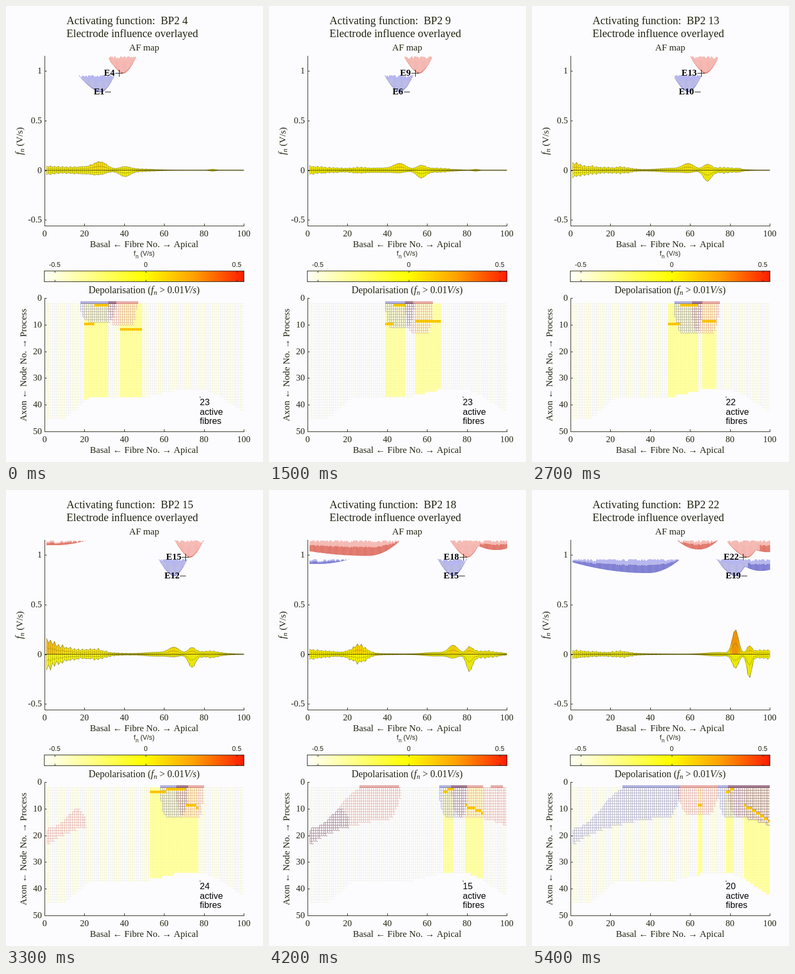
These frames come from a looping animation (480x851 px, 5.7 s). An HTML page with a canvas:

```html
<!DOCTYPE html>
<html lang="en">
<head>
<meta charset="utf-8">
<title>Activating function</title>
<style>
html, body { margin: 0; width: 100%; height: 100%; overflow: hidden; background: #fcfcfe; }
canvas { display: block; width: 480px; height: 851px; }
</style>
</head>
<body>
<canvas id="stage" width="480" height="851"></canvas>
<script>
const ctx = document.getElementById('stage').getContext('2d');
const SERIF = '"Liberation Serif", serif', SANS = '"Liberation Sans", sans-serif';
const PAPER = '#fcfcfe', INK = '#222212';
const STEP_MS = 300, STEPS = 19, PITCH = 3.722;
const RED = { body: '#f4b6b0', roof: '#f5bcb6', strong: '#df7468', mesh: '#ecbcb6', bar: '#eab0ac' };
const BLUE = { body: '#b8b8e6', roof: '#b6b6f2', strong: '#7c7cd2', mesh: '#b8b6d4', bar: '#b4b4de' };

const fibreX = n => 72 + n * PITCH;
const nodeY = n => 545 + n * 4.98;
const volts = v => 306.5 - v * 185.5;
const clamp = t => Math.min(1, Math.max(0, t));
const ease = t => { t = clamp(t); return t * t * (3 - 2 * t); };
const bell = (x, centre, width) => Math.exp(-(((x - centre) / width) ** 2));
const noise = (a, b = 0) => {
  const v = Math.sin(a * 127.1 + b * 311.7) * 43758.5453;
  return v - Math.floor(v);
};

// Electrodes sit closer together towards the apex.
const apexOf = e => 178 + 12.36 * (e - 1) - 0.165 * (e - 1) * (e - 12);

// Last node of a fibre.
const floorNode = n => 45.5 - 8 * ease((n - 8) / 16) - 3.5 * ease((n - 45) / 30) +
  9.5 * clamp((n - 78) / 22) ** 1.3;

// Number of active fibres, between a few known steps.
const COUNTS = [[0, 23], [3, 24], [5, 23], [9, 22], [11, 24], [14, 15], [18, 20]];
function activeCount(step) {
  const i = Math.max(1, COUNTS.findIndex(([s]) => s >= step));
  const [s0, c0] = COUNTS[i - 1], [s1, c1] = COUNTS[i];
  return Math.round(c0 + (c1 - c0) * (step - s0) / (s1 - s0));
}

// The reach of one electrode: a valley below it, a shoulder at the apical end
// and, for deep electrodes, a second valley on the neighbouring turn.
function field(e) {
  const apex = apexOf(e), left = 29 + 14 / e ** 2 + 2 * Math.max(0, e - 16), right = 25;
  const base = Math.min(13, 8.5 + e / 2);
  const far = {
    x: 185 + 31.5 * (e - 18),
    left: 160 - 40 * (e - 19),
    right: Math.min(60, 60 - 8 * (e - 19)),
    depth: e < 15 ? 0 : Math.min(9 + 6.6 * (e - 15), 29 - 3 * (e - 18))
  };
  const tail = Math.min(22, Math.max(0, 6 * (e - 15))), tailX = 424 + 4 * (e - 18);
  const reach = x => Math.min(1, Math.abs(x - apex) / (x < apex ? left : right));
  const isFar = x => x < apex - left;

  function depth(x) {
    if (isFar(x)) {
      const u = (x - far.x) / (x < far.x ? far.left : far.right);
      return far.depth * Math.max(0, 1 - u * u);
    }
    const shoulder = x > apex ? tail * (1 - ((x - tailX) / 50) ** 2) : 0;
    return Math.max(32 * (1 - reach(x) ** 1.6), shoulder, 0);
  }

  // First and last node covered on the fibre at x.
  function rows(x) {
    const d = depth(x);
    if (d < 0.4) return null;
    let top = 2, low = 2 + (base - 2) * (1 - reach(x) ** 6);
    if (isFar(x)) {
      low = 11.5 + 11.5 * Math.exp((76 - x) / 85);
      top = 17.5 - 15.5 * ease((x - 76) / 104);
      if (x < 200) top = Math.max(top, low - 1 - d * (0.8 + ((x - 76) / 70) ** 2));
      else low = Math.min(low, 2 + 10 * Math.sqrt(d / 12));
    } else if (tail && x > apex) low = Math.max(low, 13 + Math.max(0, x - 395) / 16);
    return low > top ? [Math.round(top), Math.round(low)] : null;
  }

  const touchesTop = x => {
    const r = rows(x);
    return r && r[0] === 2 && depth(x) > (x > apex + right ? 17 : 2);
  };
  return { e, apex, far, depth, rows, touchesTop, isStrong: x => e > 14 && (isFar(x) || x > apex + 22) };
}

// Active ranges: the positive side swings in width, the negative side takes the rest.
function activeBlocks(step, minus, plus) {
  const start = plus.apex - 8;
  const end = Math.min(444, plus.apex + 30 + 15 * Math.cos(2 * Math.PI * (step - 3) / 15));
  const farWidth = plus.e > 20 ? 10 : 0;
  const rest = Math.max(4 * PITCH, activeCount(step) * PITCH - (end - start) - farWidth);
  const centre = minus.apex - 11;
  return [[centre - rest / 2, centre + rest / 2], [start, end], [plus.far.x - 2, plus.far.x - 2 + farWidth]];
}

// Node at which firing starts, for a place u (0 to 1) within a block.
function onsetNode(block, u, step) {
  if (block === 0) return u > 0.4 ? 2 : step < 10 ? 9 : 3;
  if (block === 1) return Math.round(8 + Math.max(0, 3 - step) + u * 0.75 * Math.max(0, step - 10));
  return 8;
}

function rect(x, y, w, h, color) {
  ctx.fillStyle = color;
  ctx.fillRect(Math.round(x), Math.round(y), Math.round(w), Math.round(h));
}

function text(str, x, y, font, align = 'left', color = INK) {
  ctx.font = font;
  ctx.textAlign = align;
  ctx.fillStyle = color;
  ctx.fillText(str, x, y);
}

// Draws runs of [text, font, drop] as one centred line.
function runs(parts, cx, y) {
  const widths = parts.map(([s, font]) => { ctx.font = font; return ctx.measureText(s).width; });
  let x = cx - widths.reduce((a, b) => a + b) / 2;
  parts.forEach(([s, font, drop = 0], i) => {
    text(s, x, y + drop, font);
    x += widths[i];
  });
}

function upright(cx, cy, draw) {
  ctx.save();
  ctx.translate(cx, cy);
  ctx.rotate(-Math.PI / 2);
  draw();
  ctx.restore();
}

function polygon(points, color) {
  ctx.beginPath();
  points.forEach(([x, y]) => ctx.lineTo(x, y));
  ctx.fillStyle = color;
  ctx.fill();
}

function polyline(points, color) {
  ctx.beginPath();
  points.forEach(([x, y]) => ctx.lineTo(x, y));
  ctx.strokeStyle = color;
  ctx.stroke();
}

function drawValley(f, top, tint) {
  const roof = n => (noise(n, f.e) > 0.45 ? noise(n, f.e + 9) * 5 : 0.5);
  for (let n = 1; n < 100; n += 0.5) {
    const x = fibreX(n), x2 = fibreX(n + 0.5), d = f.depth(x), d2 = f.depth(x2);
    if (d < 0.4 && d2 < 0.4) continue;
    const a = Math.min(roof(n), d), b = Math.min(roof(n + 0.5), d2);
    const band = (from, to, color) => polygon([
      [x, top + a + (d - a) * from], [x2 + 0.3, top + b + (d2 - b) * from],
      [x2 + 0.3, top + b + (d2 - b) * to], [x, top + a + (d - a) * to]], color);
    band(0, 1, tint.body);
    band(0, 0.3, tint.roof);
    band(f.isStrong(x) ? 0.4 : 0.94, 1, tint.strong);
  }
}

function drawLabel(f, sign, y) {
  const wide = f.e > 9;
  const x = f.apex - (sign > 0 ? (wide ? 45 : 36) : (wide ? 18 : 14));
  text('E' + f.e, x, y, 'bold 17px ' + SERIF, 'left', '#000');
  const end = x + ctx.measureText('E' + f.e).width;
  rect(end + 1, y - 5, sign > 0 ? 14 : 11, 1, '#111');
  if (sign > 0) rect(end + 8, y - 11, 1, 13, '#111');
}

function drawTrace(step, minus, plus) {
  const t = step / (STEPS - 1), mid = volts(0);
  const basal = 5 + 22 * bell(step, 11, 1.8), turn = 3 + 12 * bell(step, 14, 2.5);

  function height(n, above) {
    const x = fibreX(n);
    const ripple = n % 2 ? 1 : 0.7;
    const edge = basal * Math.exp((76 - x) / 42) + 3 * bell(x, 76, 110) + turn * bell(x, 168, 19);
    const apical = (2 + 6 * t) * bell(x, plus.apex + 32, 32);
    const shoulder = 3 * bell(x, minus.apex - 32, 30);
    const source = (above ? 11 + 33 * t ** 8 : 3 + 21 * t ** 8) * bell(x, minus.apex, 16 - 8 * t ** 3);
    const sink = (above ? 5 + 8 * t : 10 + 32 * t * t) * bell(x, plus.apex + 3, 14 - 8 * t);
    return 0.5 + (edge + apical) * ripple * (0.85 + 0.3 * noise(n, step + above)) +
      shoulder + source + sink + 1.5 * bell(x, 386, 6);
  }

  const up = [], down = [];
  for (let n = 1; n <= 100; n++) {
    up.push([fibreX(n), mid - height(n, 1)]);
    down.push([fibreX(n), mid + height(n, 0)]);
  }
  for (let i = 0; i < 99; i++) {
    const rise = mid - Math.min(up[i][1], up[i + 1][1]);
    const hue = 60 - Math.min(24, Math.max(0, rise - 4) * 0.65);
    polygon([up[i], up[i + 1], [up[i + 1][0], mid], [up[i][0], mid]], `hsl(${hue},100%,50%)`);
    polygon([[up[i][0], mid], [up[i + 1][0], mid], down[i + 1], down[i]], '#fbf800');
  }
  ctx.lineWidth = 0.8;
  up.forEach((p, i) => polyline([p, down[i]], 'rgba(95,85,0,.5)'));
  for (const k of [1, 0.45]) {
    const color = `rgba(80,72,0,${0.3 + 0.35 * k})`;
    polyline(up.map(([x, y]) => [x, mid + k * (y - mid)]), color);
    polyline(down.map(([x, y]) => [x, mid + k * (y - mid)]), color);
  }
  rect(72, 306, 372, 1, '#4a4408');
}

function drawMap(step, minus, plus) {
  const blocks = activeBlocks(step, minus, plus);
  const eachFibre = draw => {
    for (let n = 1; n < 100; n++) {
      const x = Math.round(fibreX(n));
      draw(x, Math.round(fibreX(n + 1)) - x, n, blocks.findIndex(([a, b]) => x >= a - 1 && x < b - 1));
    }
  };

  eachFibre((x, w, n, block) => {
    const low = Math.floor(floorNode(n)), y0 = nodeY(2), y1 = nodeY(low), active = block >= 0;
    if (active) rect(x, y0, w, y1 - y0, '#ffffa8');
    for (let y = Math.round(y0); y < y1; y += 2)
      rect(x, y, 1, 1, active ? '#f8f886' : n % 7 < 4 ? '#f6f6a0' : '#e8e8ea');
    for (let k = 2; k <= low; k++)
      for (const dx of [1, 3]) rect(x + dx, nodeY(k), 1, 1, active ? '#f8f890' : '#eaeae6');
  });

  for (const f of [minus, plus]) eachFibre((x, w) => {
    const r = f.rows(x);
    if (r) rect(x, nodeY(r[0]), w, nodeY(r[1]) - nodeY(r[0]), 'rgba(255,255,255,.5)');
  });

  ctx.globalCompositeOperation = 'multiply';
  for (const [f, tint] of [[minus, BLUE], [plus, RED]]) eachFibre((x, w) => {
    const r = f.rows(x);
    if (!r) return;
    rect(x, nodeY(r[0]), 1, nodeY(r[1]) - nodeY(r[0]), tint.mesh);
    for (let k = r[0]; k <= r[1]; k++) rect(x + 1, nodeY(k), w - 1, 1, tint.mesh);
    if (f.touchesTop(x)) rect(x, 551, w, 5, tint.bar);
  });
  ctx.globalCompositeOperation = 'source-over';

  eachFibre((x, w, n, block) => {
    if (block < 0) return;
    const [a, b] = blocks[block], y = nodeY(onsetNode(block, (x - a) / (b - a), step)) + 1;
    rect(x, y, w, 5, '#ffcc00');
    rect(x, y + 1, 1, 3, '#e8ae00');
  });
}

function drawAxes() {
  rect(72, 93, 1, 318, INK);
  rect(72, 410, 373, 1, INK);
  rect(72, 545, 1, 250, INK);
  rect(72, 794, 373, 1, INK);
  const tick = '16.5px ' + SERIF, label = '17.3px ' + SERIF, title = '18px ' + SERIF;
  const italic = 'italic 18px ' + SERIF, sub = 'italic 13px ' + SERIF;
  for (let n = 0; n <= 100; n += 20) {
    for (const y of [410, 794]) {
      rect(fibreX(n), y - 4, 1, 4, INK);
      text(n, fibreX(n), y + 20, tick, 'center');
    }
  }
  const rowTick = (value, y) => {
    rect(72, y, 4, 1, INK);
    text(value, 67, y + 5, tick, 'right');
  };
  for (let v = -0.5; v <= 1; v += 0.5) rowTick(v, volts(v));
  for (let n = 0; n <= 50; n += 10) rowTick(n, nodeY(n));
  text('AF map', 258, 83, label, 'center');
  for (const y of [450, 834]) text('Basal ← Fibre No. → Apical', 258, y, label, 'center');
  runs([['Depolarisation (', title], ['f', italic], ['n', sub, 3], [' > ', title], ['0.01', title],
    ['V/s', italic], [')', title]], 258, 536);
  upright(31, 252, () => runs([['f', italic], ['n', sub, 3], [' (V/s)', label]], 0, 0));
  upright(38, 670, () => text('Axon ← Node No. → Process', 0, 0, label, 'center'));
}

function drawColorbar() {
  const heat = ctx.createLinearGradient(72, 0, 444, 0);
  ['#fffff8', '#ffff80', '#ffff00', '#ffa000', '#ff1c00'].forEach((c, i) => heat.addColorStop(i / 4, c));
  rect(72, 494, 372, 20, heat);
  ctx.strokeStyle = INK;
  ctx.lineWidth = 1;
  ctx.strokeRect(71.5, 494.5, 373, 20);
  for (let v = -0.5; v <= 0.5; v += 0.5) {
    const x = 261 + v * 340;
    rect(x, 494, 1, 4, INK);
    rect(x, 511, 1, 4, INK);
    text(v, x, 487, '12.5px ' + SANS, 'center');
  }
  runs([['f', '12.5px ' + SANS], ['n', '10px ' + SANS, 5], [' (V/s)', '12.5px ' + SANS]], 258, 466);
}

function draw(step) {
  rect(0, 0, 480, 851, PAPER);
  const minus = field(step + 1), plus = field(step + 4);
  text('Activating function:  BP2 ' + plus.e, 113, 34, '20.5px ' + SERIF);
  text('Electrode influence overlayed', 113, 58, '20.5px ' + SERIF);

  drawValley(plus, 94, RED);
  drawValley(minus, 129, BLUE);
  drawLabel(plus, 1, 130);
  drawLabel(minus, -1, 165);
  drawTrace(step, minus, plus);
  drawColorbar();
  drawMap(step, minus, plus);
  drawAxes();

  rect(362, 730, 44, 54, PAPER);
  rect(362, 729, 1, 2, '#000');
  [activeCount(step), 'active', 'fibres'].forEach((line, i) =>
    text(line, 362, 745 + i * 17.7, '16.5px ' + SANS, 'left', '#000'));
}

let shown = -1;
function tick() {
  const step = Math.floor(performance.now() / STEP_MS) % STEPS;
  if (step !== shown) draw(shown = step);
  requestAnimationFrame(tick);
}
tick();
</script>
</body>
</html>
```
